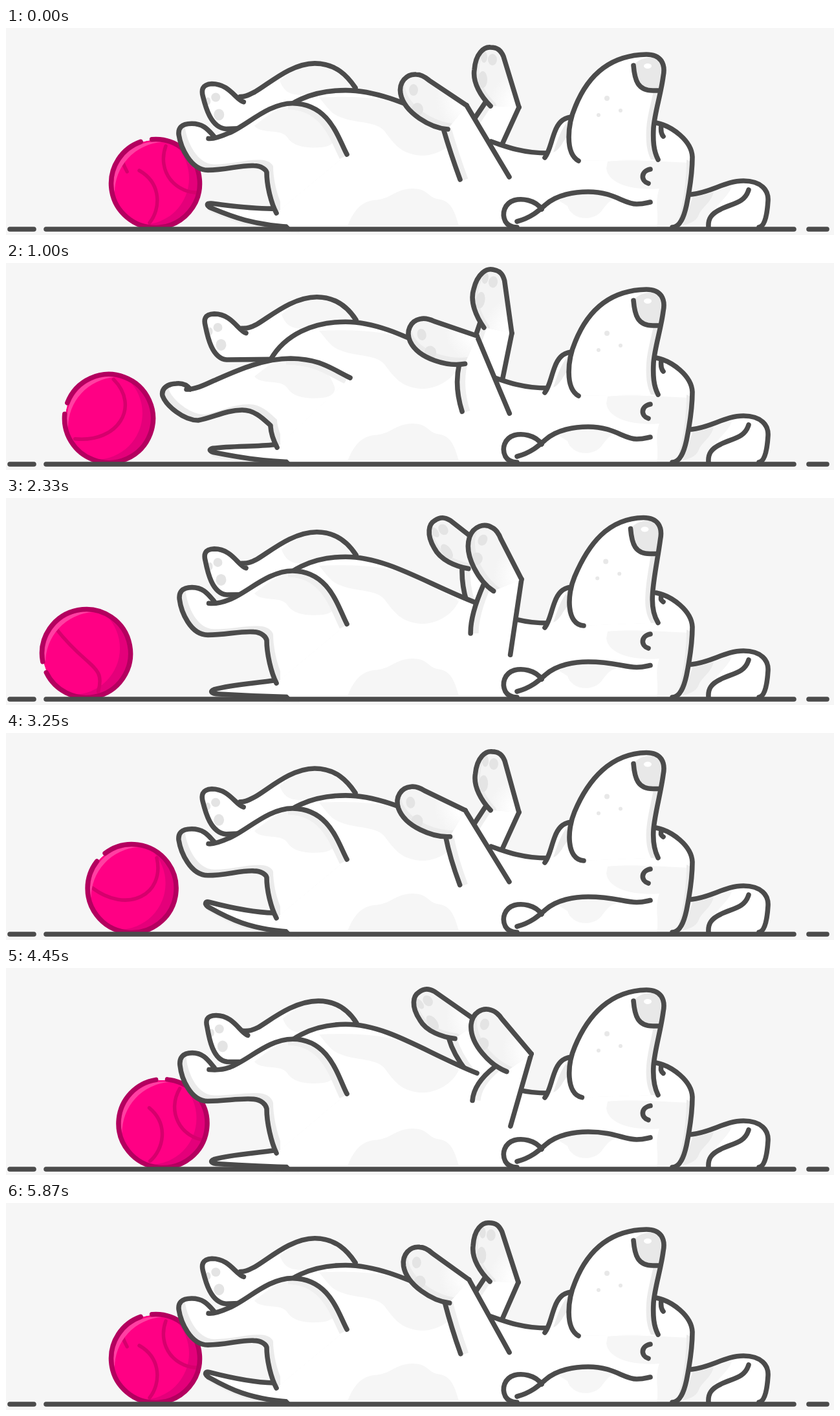
An HTML page that plays this animation: 1280x321 px, repeating every 5.91 s.

```html
<!DOCTYPE html>
<html lang="en">
<head>
<meta charset="utf-8">
<title>Sleeping dog</title>
<style>
html, body { margin: 0; width: 100%; height: 100%; overflow: hidden; background: #f6f6f6; }
svg { display: block; width: 100vw; height: 100vh; }
.ink { fill: none; stroke: #4b4b4b; stroke-width: 7.6; stroke-linecap: round; stroke-linejoin: round; }
.white { fill: #fff; }
.patch { fill: #f6f6f6; }
.shade { fill: #ebebeb; }
.strip { fill: none; stroke: #efefef; stroke-width: 9; }
.pad { fill: #e4e4e4; }
.nose { fill: #e8e8e8; }
.seam { fill: none; stroke: #d6006d; stroke-width: 5.5; stroke-linecap: round; }
</style>
</head>
<body>
<svg id="stage" viewBox="0 0 1280 321" preserveAspectRatio="none">
  <radialGradient id="pawTone" gradientUnits="userSpaceOnUse" cx="0" cy="0" r="60">
    <stop offset="0.3" stop-color="#fff"/><stop offset="0.9" stop-color="#f4f4f4"/>
  </radialGradient>
</svg>
<script>
const LOOP = 5910, HALF = LOOP / 2;
const stage = document.getElementById('stage');

function el(tag, attrs, parent = stage) {
  const node = document.createElementNS('http://www.w3.org/2000/svg', tag);
  set(node, attrs);
  return parent.appendChild(node);
}
function set(node, attrs) {
  for (const key in attrs) node.setAttribute(key, attrs[key]);
}
const path = (cls, d = '', parent = stage) => el('path', { class: cls, d }, parent);
const group = (parent = stage) => el('g', {}, parent);
const dot = (cls, cx, cy, rx, ry, parent) => el('ellipse', { class: cls, cx, cy, rx, ry }, parent);
const move = (node, x, y, r = 0) => set(node, { transform: `translate(${x} ${y}) rotate(${r})` });

const clamp = v => Math.max(0, Math.min(1, v));
const lerp = (a, b, k) => a + (b - a) * k;
const ease = (a, b, t) => (1 - Math.cos(Math.PI * clamp((t - a) / (b - a)))) / 2;

// Interpolates every number of two paths with the same commands.
function blend(a, b, k) {
  const target = b.match(/-?[\d.]+/g);
  let i = 0;
  return a.replace(/-?[\d.]+/g, n => lerp(+n, +target[i++], k).toFixed(2));
}
const joined = d => d.replace(/(.)M/g, '$1L') + 'Z';

// Cyclic smooth curve through keys [time, value...], flat at turning points.
function curve(keys, period, t) {
  t = ((t % period) + period) % period;
  const n = keys.length;
  const at = i => {
    const lap = Math.floor(i / n), k = keys[i - lap * n];
    return [k[0] + lap * period, ...k.slice(1)];
  };
  let i = n - 1;
  while (i > 0 && keys[i][0] > t) i--;
  const [p, a, b, q] = [at(i - 1), at(i), at(i + 1), at(i + 2)];
  const h = b[0] - a[0], u = (t - a[0]) / h;
  return a.slice(1).map((_, j) => {
    const slope = (l, r) => (r[j + 1] - l[j + 1]) / (r[0] - l[0]);
    const tangent = (l, r) => (l * r <= 0 ? 0 : 2 * l * r / (l + r));
    const s = slope(a, b), m0 = tangent(slope(p, a), s), m1 = tangent(s, slope(b, q));
    const v = 1 - u;
    return a[j + 1] * (1 + 2 * u) * v * v + b[j + 1] * u * u * (3 - 2 * u)
      + h * (m0 * u * v * v - m1 * u * u * v);
  });
}

let clipCount = 0;
// Light shape with a grey rim on the side opposite to (dx, dy).
function shaded(parent, dx, dy) {
  const id = 'clip' + clipCount++;
  const clip = path('', '', el('clipPath', { id }, parent));
  const inside = el('g', { 'clip-path': `url(#${id})` }, parent);
  const grey = path('shade', '', inside), light = path('white', '', inside);
  move(light, dx, dy);
  return {
    inside, light,
    draw(d, lit = d) {
      [clip, grey].forEach(p => set(p, { d }));
      set(light, { d: lit });
    }
  };
}

function makeBall() {
  const root = group();
  const clip = el('clipPath', { id: 'ballClip' }, root);
  el('circle', { r: 67 }, clip);
  const face = el('g', { 'clip-path': 'url(#ballClip)' }, root);
  el('circle', { r: 68, fill: '#e4007a' }, face);
  el('circle', { r: 72, cx: -20, cy: -8, fill: '#ff0084' }, face);
  const spin = group(face);
  const seams = ['M-25,-20C10,0 8,40 -9,61', 'M16,-58C2,-20 30,18 72,14'].map(d => path('seam', d, spin));
  const smile = path('seam', '', spin);
  [...seams, smile].forEach(s => set(s, { pathLength: 1 }));
  path('', 'M-63,15A65,65 0 0 1 10,-64A78,78 0 0 0 -63,15Z', face).setAttribute('fill', '#ff40a2');
  const rim = el('circle', {
    r: 68.5, fill: 'none', stroke: '#b3005f', 'stroke-width': 7.5,
    'stroke-linecap': 'round', pathLength: 360, 'stroke-dasharray': '345 15'
  }, root);
  const trim = (s, k) => set(s, { 'stroke-dasharray': `${k} 2`, opacity: k > 0 ? 1 : 0 });
  const keys = [[0, 231], [620, 194], [1000, 159], [1250, 139], [1700, 117], [2000, 114.5], [2330, 124],
    [2500, 132], [3120, 182], [3250, 194.5], [3750, 232.5], [4250, 243.5], [4450, 242.5], [5000, 236.5], [5620, 231]];
  return t => {
    const [x] = curve(keys, LOOP, t), angle = 0.9 * (x - 231);
    move(root, x, 241);
    move(spin, 0, 0, angle);
    move(rim, 0, 0, angle + 265.5);
    seams.forEach(s => trim(s, 1 - clamp((229 - x) / 25)));
    trim(smile, clamp((235 - x) / 35));
    set(smile, { d: blend('M-51,-34C-28,30 38,36 58,-19', 'M-61,12C-20,28 -25,0 43,-42', clamp((159 - x) / 34)) });
  };
}

function makeTail() {
  const shadow = path('strip'), fill = path('white'), line = path('ink');
  move(shadow, 4, 4);
  const up = 'M414,279C380,278 345,270 315,262C308,260 306,264 312,269C340,285 375,306 450,309';
  const down = 'M416,283C385,288 350,290 322,299C315,302 318,306 330,306C360,307 400,308 450,309';
  return t => {
    const phase = t < 1000 ? 0.17 + t * 0.004136 : 4.306 + (t - 1000) / 260;
    const d = blend(up, down, (1 - Math.cos(2 * Math.PI * phase)) / 2);
    [shadow, line].forEach(p => set(p, { d }));
    set(fill, { d: d + 'L450,285Z' });
  };
}

function makeFarHindLeg() {
  const fill = path('white');
  const patch = path('patch', 'M423,82C428,95 435,104 455,104L500,96L536,93C528,78 505,59 477,59C455,59 440,68 423,82Z');
  const pads = group();
  dot('pad', 324, 108, 7, 7, pads);
  dot('pad', 329, 135, 8, 9, pads);
  dot('pad', 312, 114, 4, 6, pads);
  const line = path('ink');
  const rest = 'M540,93C528,75 510,55 477,55C440,55 405,88 385,99C377,103 372,107 362,107'
    + 'M367,115C355,112 345,87 318,87C302,88 302,98 304,106C308,122 316,155 340,157L412,154';
  const lift = 'M542,85C530,66 512,51 483,51C445,51 410,80 390,92C382,96 376,98 366,97'
    + 'M374,104C362,100 352,73 325,73C309,73 309,82 311,90C314,108 320,143 342,145L412,146';
  return b => {
    const d = blend(rest, lift, b);
    set(line, { d });
    set(fill, { d: joined(d) });
    move(patch, 5 * b, -4 * b);
    move(pads, 6 * b, -14 * b);
  };
}

function makeBody() {
  const fill = path('white');
  const spot = path('patch', 'M484,108C520,106 580,106 615,120C640,132 690,155 700,163C690,185 665,199 640,198'
    + 'C610,195 600,180 585,160C570,142 530,150 505,132C497,125 490,115 484,108Z');
  path('patch', 'M528,307C535,290 545,270 568,267C595,266 600,250 628,249C655,249 650,264 672,266C690,270 695,290 700,307Z');
  const line = path('ink');
  const chest = 'C775,185 800,194 838,194';
  path('ink', 'M750,176' + chest);
  const rest = 'M408,152C430,115 475,97 525,97C590,97 655,137 728,163';
  const lift = 'M410,148C432,108 475,87 525,87C590,87 650,132 728,163';
  return b => {
    const d = blend(rest, lift, b);
    set(line, { d });
    set(fill, { d: d + 'L750,176' + chest + 'L1000,200L1000,310L440,310L418,287L403,222Z' });
    move(spot, 0, -5 * b);
  };
}

function makeNearHindLeg() {
  const fill = shaded(stage, 10, -9);
  path('white', 'M424,300L424,240L515,160L560,190Z', fill.inside);
  const spot = path('patch', 'M384,152C395,166 425,155 435,170C445,186 470,187 490,185C505,183 510,175 508,168'
    + 'C495,135 475,119 443,120C420,122 402,138 384,152Z', fill.inside);
  const strip = path('strip', '', fill.inside), line = path('ink');
  move(strip, -7, 5);
  const rest = 'M527,196C513,170 500,118 443,117C405,117 372,152 345,163C334,168 322,173 313,172'
    + 'M321,168C312,158 305,149 287,149C270,149 266,157 267,166C270,185 285,221 312,221'
    + 'C340,221 362,213 383,214C395,214 402,220 403,224C403,245 410,272 418,287';
  const lift = 'M527,195C513,168 500,110 443,110C405,110 372,145 345,154C334,158 325,158 314,157'
    + 'M322,154C312,142 305,131 288,131C272,131 268,140 269,150C271,170 285,206 312,206'
    + 'C340,206 362,201 383,203C395,204 402,212 403,218C403,240 410,270 418,287';
  const kicked = 'M532,178C500,162 485,149 440,148C395,148 350,170 320,183C305,190 292,196 279,196'
    + 'M285,196C280,189 272,186 263,187C246,188 240,197 242,206C248,222 275,244 297,244'
    + 'C320,240 340,228 365,228C385,228 398,242 409,252C409,262 414,276 419,286';
  return (b, kick) => {
    const d = blend(blend(rest, lift, b), kicked, kick);
    set(line, { d });
    set(strip, { d: d.split('C').slice(0, 2).join('C') });
    fill.draw(joined(d));
    move(spot, 0, lerp(-7 * b, 24, kick));
  };
}

// Rigid forearm hinged at the elbow, with an upper arm reaching to the body.
function makeArm(outline, rim, pads, keys, upper) {
  const fill = path('white'), strip = path('strip'), lines = path('ink');
  const paw = group(), skin = shaded(paw, ...rim);
  skin.draw(outline + 'Z', outline + 'L30,30L-20,70Z');
  skin.light.style.fill = 'url(#pawTone)';
  pads.forEach(p => dot('pad', ...p, skin.inside));
  path('ink', outline, paw);
  move(strip, 8, 0);
  return t => {
    const [x, y, turn] = curve(keys, HALF, t), r = turn * Math.PI / 180;
    const local = (u, v) => [x + u * Math.cos(r) - v * Math.sin(r), y + u * Math.sin(r) + v * Math.cos(r)];
    const { start, bend, inner, outer } = upper(x, local);
    const inside = `M${start}Q${bend} ${inner}`;
    set(fill, { d: `${inside}L${outer}L${x},${y}Z` });
    set(strip, { d: inside });
    set(lines, { d: `${inside}M${outer}L${x},${y}` });
    move(paw, x, y, turn);
  };
}

const makeFarArm = () => makeArm(
  'M-44,-2C-58,-16 -72,-38 -69,-58C-67,-84 -54,-94 -44,-93C-33,-93 -28,-88 -24,-79L0,0',
  [8, -4],
  [[-54, -78, 5, 9], [-41, -74, 7, 9], [-56, -43, 7, 13]],
  [[0, 793, 123, 0], [295, 793, 123, 1.5], [1000, 782, 109, 9], [1495, 730, 84, -38],
    [1700, 727, 82, -37], [2330, 752, 86, -35], [2915, 792, 123, -1]],
  (x, local) => {
    const start = local(-51, -9);
    return { start, bend: [start[0] * 0.6 + 281, (start[1] + 160) / 2], inner: [712, 160], outer: [768, 178] };
  });

const makeNearArm = () => makeArm(
  'M-29,37C-55,35 -96,12 -102,-18C-105,-36 -93,-49 -78,-48C-70,-48 -64,-44 -58,-39L0,0',
  [7, -9],
  [[-82, -24, 7, 9], [-76, 6, 9, 10]],
  [[0, 712, 120, 0], [295, 710, 120, -8], [1000, 728, 113, -15], [1495, 812, 133, 16],
    [1700, 817, 136, 18], [2330, 797, 126, 29], [2915, 716, 119, 2]],
  (x, local) => {
    const k = (x - 712) / 105;
    return {
      start: local(lerp(-36, -50, k), 36),
      bend: [lerp(687, 725, k), lerp(194, 178, k)],
      inner: [lerp(702, 722, k), lerp(235, 204, k)],
      outer: [lerp(778, 780, k), lerp(231, 246, k)]
    };
  });

function makeHead() {
  const ear = 'M1060,258C1090,255 1112,237 1140,237C1168,237 1179,252 1178,268C1177,285 1174,308 1164,309';
  path('white', ear + 'L1040,309Z');
  path('patch', 'M1062,260C1085,257 1102,250 1122,244C1120,262 1086,280 1082,309L1040,309Z');
  path('shade', 'M1062,262C1075,260 1086,257 1094,254C1090,272 1076,276 1070,292C1066,300 1056,304 1046,306Z');
  path('ink', ear);
  path('ink', 'M1148,251C1142,272 1122,272 1105,281C1090,288 1085,296 1086,309');

  const neck = 'M833,201C840,192 842,178 848,162C853,148 860,140 873,138';
  const skull = 'C1030,152 1060,175 1061,200C1061,225 1057,250 1052,275C1048,293 1042,309 1030,309';
  path('white', neck + 'L1005,147' + skull + 'L838,309L833,201Z');
  path('patch', 'M930,207C960,204 1000,206 1058,209C1058,235 1052,262 1046,290C1042,300 1036,309 1024,309'
    + 'L1006,309C1010,290 1002,270 1010,249C970,252 932,243 928,218Z');
  path('shade', 'M1060,208C1060,235 1053,290 1036,309C1046,280 1052,240 1052,204Z');
  path('patch', 'M852,266C880,254 920,254 945,264C925,268 925,286 910,292C890,300 872,290 868,276Z');
  path('shade', 'M872,141C860,152 853,172 846,193C858,188 862,172 870,166Z');
  path('ink', neck);
  path('ink', 'M1005,147' + skull);

  const flap = 'M828,281C818,266 797,264 786,267C770,272 766,288 772,300C776,307 783,309 790,309';
  path('white', flap + 'Z');
  path('ink', flap);
  const mouth = path('ink'), brow = path('ink');
  const eye = path('ink', 'M996,219C981,222 981,237 993,241');

  const snout = shaded(stage, -11, 0);
  const freckles = group();
  dot('nose', 929, 109, 4, 4, freckles);
  dot('nose', 950, 128, 3, 3, freckles);
  dot('nose', 916, 135, 3, 3, freckles);
  const nose = group(snout.inside), noseLine = 'M970,58C972,82 977,97 1000,97';
  path('nose', noseLine + 'L1014,97L1020,52C1005,42 980,44 970,58Z', nose);
  dot('white', 992, 59, 6, 4, nose);
  path('ink', noseLine + 'L1010,97', nose);
  const line = path('ink');

  return t => {
    const h = ease(1200, 2000, t) - ease(4100, 5000, t);
    const x = -4.5 * (ease(1200, 1950, t) - ease(2540, 3200, t)), y = -10.5 * h;
    const d = `M${885 + 8 * h},${206 - 8 * h}C${864 + 2 * h},${194 + 2 * h} ${868 - h},150 ${880 - h},122`
      + `C900,72 ${935 + x},${42 + y} ${990 + x},${41 + y}C${1012 + x},${41 + y} ${1020 + x},${55 + y} ${1016 + x},${75 + y}`
      + `C${1012 + x},${105 + y} ${1003 + x / 2},${130 + y / 2} ${1001 + x / 3},${155 + y / 2}`
      + `C${1000 + x / 3},${175 + y} ${1001 + x / 3},${190 + y} 1008,${204 + y}`;
    set(line, { d });
    snout.draw(d + 'Z', d + 'L1030,260L885,260Z');
    move(nose, x, y);
    move(freckles, x * 0.4, y);
    move(eye, 0, -8 * h);
    set(brow, { d: `M1013,151C1012,158 1012,${163 - 5 * h} 1016,${168 - 7 * h}` });
    set(mouth, { d: 'M790,300C812,294 824,283 834,274C852,258 880,254 900,254'
      + `C940,254 955,${273 + y} 975,${273 + y}C985,${273 + y} 991,${271 + y} 996,${270 + y}` });
  };
}

const ball = makeBall();
const tail = makeTail();
const farHindLeg = makeFarHindLeg();
const farArm = makeFarArm();
const body = makeBody();
const nearHindLeg = makeNearHindLeg();
const nearArm = makeNearArm();
const head = makeHead();
path('ink', 'M6,312H43M62,312H1218M1241,312H1269');

function render(t) {
  const breath = (1 - Math.cos(2 * Math.PI * (t - 188) / HALF)) / 2;
  const kick = ease(100, 800, t) - ease(1050, 1600, t);
  ball(t);
  tail(t);
  farHindLeg(breath);
  farArm(t);
  body(breath);
  nearHindLeg(breath, kick);
  nearArm(t);
  head(t);
}

const begin = performance.now();
function tick() {
  render((performance.now() - begin) % LOOP);
  requestAnimationFrame(tick);
}
tick();
</script>
</body>
</html>
```
